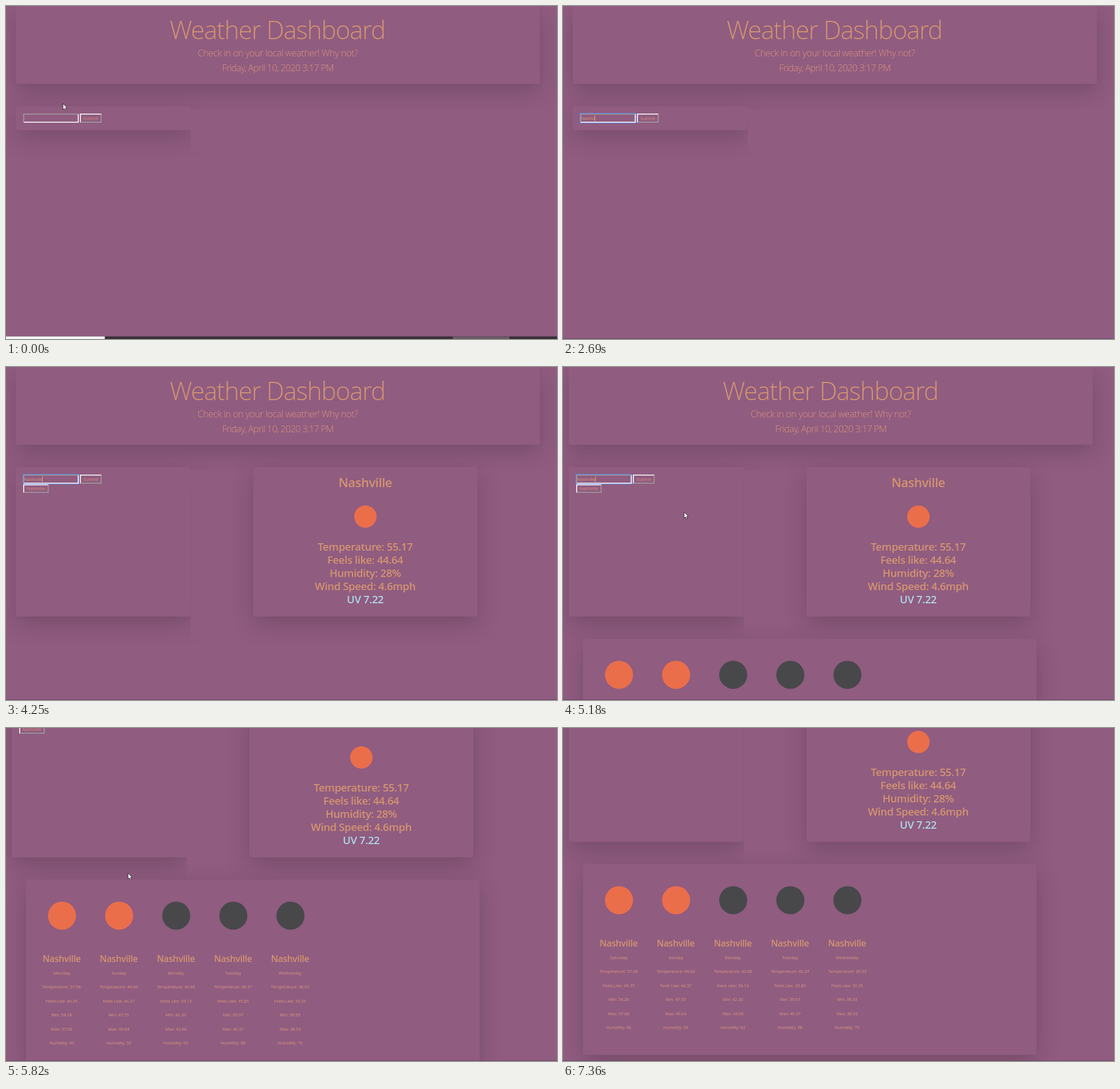
These frames come from a looping animation (962x582 px, 8.24 s). An HTML page:

```html
<!DOCTYPE html>
<html lang="en">
<head>
<meta charset="utf-8">
<title>Weather Dashboard</title>
<style>
html, body { margin: 0; width: 100%; height: 100%; overflow: hidden; background: #905c80; }
svg { display: block; width: 962px; height: 582px; }
text { font-family: "Open Sans", "Noto Sans", sans-serif; fill: #d3946f; white-space: pre; }
.mid { text-anchor: middle; }
.title { font-size: 44px; font-weight: 300; letter-spacing: -.029em; }
.lead { font-size: 16.2px; font-weight: 300; letter-spacing: -.027em; fill: #dc937a; }
.date { letter-spacing: -.041em; }
.head { font-size: 22px; font-weight: 600; letter-spacing: -.02em; }
.stat { font-size: 18.5px; font-weight: 600; letter-spacing: -.02em; }
.uv { fill: #add8e6; }
.city { font-size: 15.6px; font-weight: 600; letter-spacing: -.02em; }
.row { font-size: 7.5px; letter-spacing: -.01em; fill: #dc9878; }
.typed { font-size: 7.5px; fill: #dd986f; }
.btn { font-size: 7.8px; fill: #df907a; }
</style>
</head>
<body>
<svg id="stage" viewBox="0 0 962 582">
  <defs>
    <filter id="shadow" filterUnits="userSpaceOnUse" x="-80" y="-80" width="1140" height="1000" color-interpolation-filters="sRGB">
      <feDropShadow dx="0" dy="12.8" stdDeviation="19.2" flood-color="#000" flood-opacity=".175"/>
    </filter>
  </defs>
  <rect width="962" height="582" fill="#905c80"/>
  <g id="page"></g>
  <rect y="581" width="962" height="1" fill="#000" opacity=".2"/>
  <g id="taskbar">
    <rect y="577.5" width="962" height="5" fill="#392f38"/>
    <rect y="577.5" width="172.5" height="5" fill="#f6f4f6"/>
    <rect x="780" y="577.5" width="99" height="5" fill="#6b5b68"/>
  </g>
  <path id="beam" d="M55.5 184.5H57.5L58.5 185.5L59.5 184.5H61M58.5 185.5V200M55.5 200.5H57.5L58.5 199.5L59.5 200.5H61" fill="none" stroke="#221a20"/>
  <path id="arrow" d="M.5 .5V11.2L2.9 9L4.5 12.5L6.2 11.8L4.7 8.3H7.7Z" fill="#fff" stroke="#1c171b" stroke-width=".8"/>
</svg>
<script>
const LOOP = 8240;
const BG = '#905c80', SUN = '#eb6e4b', NIGHT = '#48484a', LIGHT = '#f3edf1', GREY = '#9e959b';
const $ = id => document.getElementById(id);
const page = $('page');

function add(parent, tag, attrs, content) {
  const el = document.createElementNS('http://www.w3.org/2000/svg', tag);
  for (const key in attrs) el.setAttribute(key, attrs[key]);
  if (content) el.textContent = content;
  parent.appendChild(el);
  return el;
}
const group = () => add(page, 'g', {});
const panel = (g, x, y, width, height) =>
  add(g, 'rect', { x, y, width, height, rx: 3, fill: BG, filter: 'url(#shadow)' });
const label = (g, x, y, cls, str) => add(g, 'text', { x, y, class: cls }, str);
const disc = (g, cx, cy, r, fill) => add(g, 'circle', { cx, cy, r, fill });

// Two-tone frame: first colour on top and left, second on bottom and right.
function bevel(g, x, y, w, h, first, second) {
  const b = 1.8;
  add(g, 'path', { fill: second, d: `M${x + w} ${y}v${h}h${-w}l${b} ${-b}h${w - 2 * b}v${2 * b - h}z` });
  add(g, 'path', { fill: first, d: `M${x} ${y + h}v${-h}h${w}l${-b} ${b}h${2 * b - w}v${h - 2 * b}z` });
}

// Header
const header = group();
panel(header, 17, 0, 915, 136);
label(header, 473.8, 58, 'mid title', 'Weather Dashboard');
label(header, 474.5, 88, 'mid lead', 'Check in on your local weather! Why not?');
label(header, 474.5, 113.5, 'mid lead date', 'Friday, April 10, 2020 3:17 PM');

// Search form; the neighbouring column covers the right part of its shadow
const form = group();
const formPanel = panel(form, 17, 175, 305.5, 42);
const column = add(form, 'rect', { x: 322.5, y: 180, width: 609, fill: BG });
bevel(form, 30, 188, 97, 16, GREY, LIGHT);
bevel(form, 129, 188, 38, 16, LIGHT, GREY);
label(form, 148, 199, 'mid btn', 'Submit');
const ring = add(form, 'rect', { x: 29.5, y: 187.5, width: 98, height: 17, rx: .5, fill: 'none', stroke: '#4d90fe', 'stroke-opacity': .85 });
const typed = label(form, 31.5, 199, 'typed', '');
const caret = add(form, 'rect', { y: 191, width: 1, height: 10, fill: '#e3a96c' });

// Current conditions
const today = group();
bevel(today, 30, 205, 44.5, 15, LIGHT, GREY);
label(today, 52.3, 215, 'mid btn', 'Nashville');
panel(today, 432, 175, 391, 261);
label(today, 627.3, 210, 'mid head', 'Nashville');
disc(today, 627.5, 261.5, 19.6, SUN);
['Temperature: 55.17', 'Feels like: 44.64', 'Humidity: 28%', 'Wind Speed: 4.6mph', 'UV 7.22'].forEach((str, i) =>
  label(today, 627.2, 321 + 23.1 * i, i < 4 ? 'mid stat' : 'mid stat uv', str));

// Five-day forecast
const forecast = group();
panel(forecast, 42, 475, 792, 333);
const titles = ['', 'Temperature: ', 'Feels Like: ', 'Min: ', 'Max: ', 'Humidity: '];
[
  ['Saturday', '57.06', '49.35', '54.28', '57.06', '40'],
  ['Sunday', '49.64', '44.37', '47.55', '49.64', '56'],
  ['Monday', '43.68', '39.13', '42.30', '43.68', '62'],
  ['Tuesday', '40.37', '35.85', '39.67', '40.37', '68'],
  ['Wednesday', '38.93', '33.35', '38.93', '38.93', '70']
].forEach((day, i) => {
  const x = 104.2 + 99.7 * i;
  disc(forecast, x + .6, 538, 24.5, i < 2 ? SUN : NIGHT);
  label(forecast, x, 619.3, 'mid city', 'Nashville');
  day.forEach((value, k) => label(forecast, x, 641 + 24.4 * k, 'mid row', titles[k] + value));
});

// Timed states: [start, value...]
const LETTERS = [[0, 0], [1460, 1], [1770, 3], [2100, 4], [2400, 5], [2690, 6], [3010, 9]];
const CARET = [[0, 0], [850, 1], [1150, 0], [1460, 1], [3620, 0], [4250, 1]];
const SCROLL = [[0, 0, 0], [4560, 7, 0], [5500, 7, 121], [5820, 7, 210], [6110, 7, 237]];
const POINTER = [[0, 99, 170], [260], [4880, 4, 191], [5180, 211, 253], [5500, 212, 253], [5820, 212.6, 253],
  [6110], [6430, 214, 253], [6740, 699, 491], [7060, 854, 548], [7360]];

const at = (steps, t) => steps.filter(s => s[0] <= t).pop();
const show = (el, on) => el.setAttribute('visibility', on ? 'visible' : 'hidden');
const arrow = $('arrow'), beam = $('beam'), taskbar = $('taskbar');

function draw(t) {
  const done = t >= 4250;
  const [, sx, sy] = at(SCROLL, t);
  page.setAttribute('transform', `translate(${-sx} ${-sy})`);

  const height = done ? 261 : 42;
  formPanel.setAttribute('height', height);
  column.setAttribute('height', height + 33);
  show(ring, t >= 850);
  show(today, done);
  show(forecast, t >= 4560);

  const count = at(LETTERS, t)[1];
  typed.textContent = 'Nashville'.slice(0, count);
  caret.setAttribute('x', count ? Math.round(31.5 + typed.getComputedTextLength()) : 31);
  show(caret, at(CARET, t)[1]);

  const [, px, py] = at(POINTER, t);
  show(arrow, px !== undefined);
  if (px !== undefined) arrow.setAttribute('transform', `translate(${px} ${py})`);
  show(beam, t >= 260 && t < 570);
  show(taskbar, t < 260);
}

const start = performance.now();
function tick() {
  draw((performance.now() - start) % LOOP);
  requestAnimationFrame(tick);
}
tick();
</script>
</body>
</html>
```
